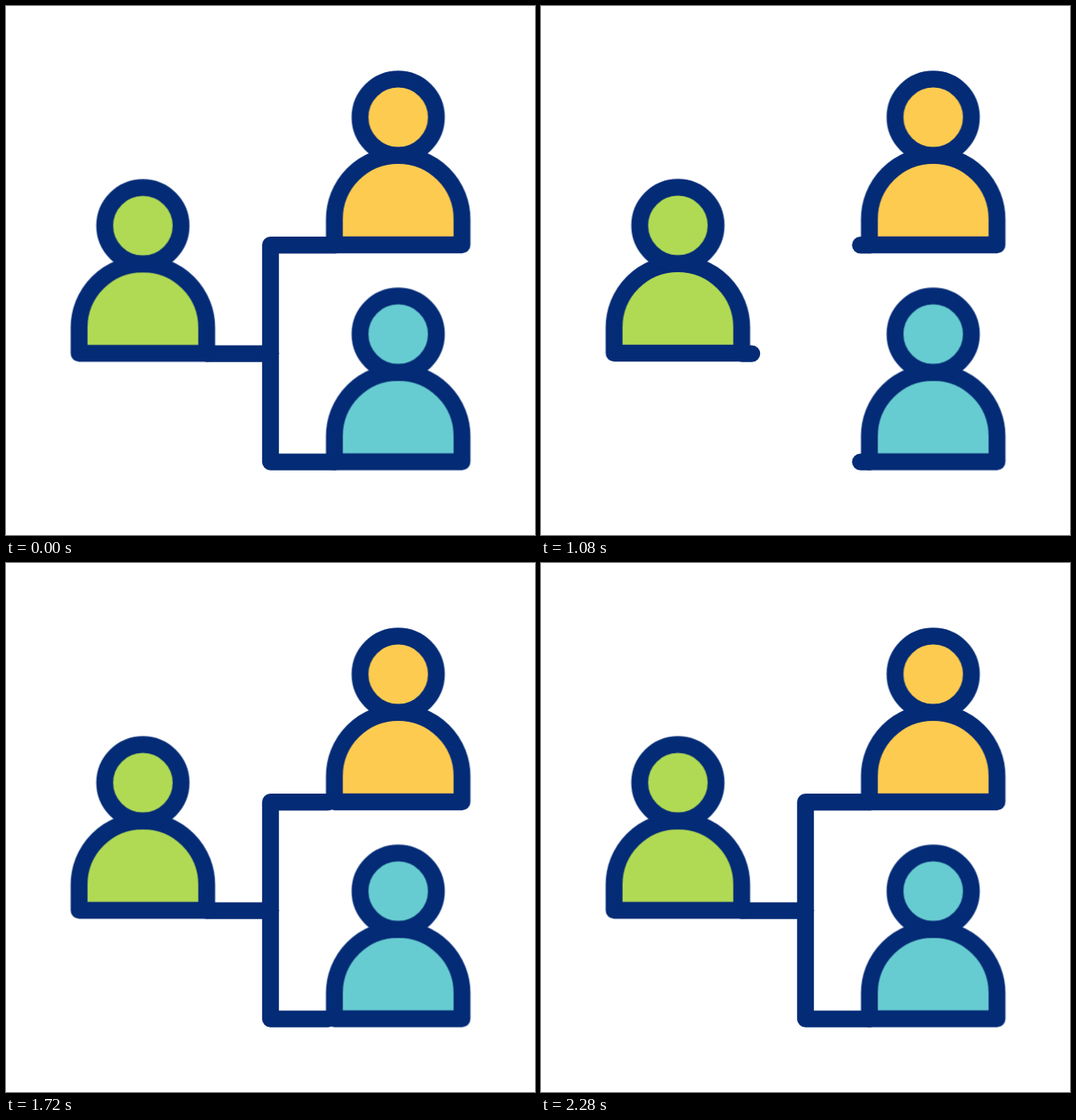
Recreate the animation shown at these times as an HTML page without scripts. Size 640 by 640 pixels, loop 2520 ms.

```html
<!DOCTYPE html>
<html lang="en">
<head>
<meta charset="utf-8">
<title>Team links</title>
<style>
  html, body { margin: 0; width: 100%; height: 100%; overflow: hidden; background: #fff; }
  svg { display: block; width: 100%; height: 100%; }

  .ink { stroke: #042b76; stroke-width: 20.4; stroke-linecap: round; stroke-linejoin: round; }
  .link { fill: none; stroke-dasharray: 1 2; }
  .stem { animation: stem 2.52s linear infinite; }
  .arm { animation: arm 2.52s linear infinite; }

  .body { animation: body 2.52s linear infinite; }
  .head { animation: head 2.52s linear infinite; }
  .late .body, .late .head { animation-delay: .7s; }

  /* A negative offset erases from the start, a positive one draws from it */
  @keyframes stem {
    0% { stroke-dashoffset: 0; }
    12.7% { stroke-dashoffset: 0; animation-timing-function: cubic-bezier(.33, 0, .67, 1); }
    28.57% { stroke-dashoffset: -1.01; animation-timing-function: step-end; }
    38.89% { stroke-dashoffset: 1.01; animation-timing-function: cubic-bezier(.33, 0, .67, 1); }
    54.76%, 100% { stroke-dashoffset: 0; }
  }
  @keyframes arm {
    0% { stroke-dashoffset: 0; }
    19.05% { stroke-dashoffset: 0; animation-timing-function: cubic-bezier(.42, 0, .75, .8); }
    34.92% { stroke-dashoffset: -.64; animation-timing-function: cubic-bezier(.39, .575, .565, 1); }
    48.41% { stroke-dashoffset: -1.01; animation-timing-function: step-end; }
    54.76% { stroke-dashoffset: 1.01; animation-timing-function: cubic-bezier(.33, 0, .67, 1); }
    70.08%, 100% { stroke-dashoffset: 0; }
  }

  /* The head flies a little higher than the body */
  @keyframes body {
    0%, 42.86% { transform: translateY(0); }
    45.24% { transform: translateY(-15.7px); animation-timing-function: ease-out; }
    47.22% { transform: translateY(-23px); animation-timing-function: ease-in; }
    51.59% { transform: translateY(-6.8px); animation-timing-function: ease-out; }
    60.32% { transform: translateY(-2.6px); }
    62.5%, 100% { transform: translateY(0); }
  }
  @keyframes head {
    0%, 42.86% { transform: translateY(0); }
    45.24% { transform: translateY(-22.8px); animation-timing-function: ease-out; }
    47.22% { transform: translateY(-30px); animation-timing-function: ease-in; }
    51.59% { transform: translateY(-13.7px); animation-timing-function: ease-out; }
    60.32% { transform: translateY(-2.6px); }
    62.5%, 100% { transform: translateY(0); }
  }
</style>
</head>
<body>
<svg viewBox="0 0 640 640">
  <g class="ink">
    <path class="link stem" pathLength="1" d="M243.4 420.6H320"/>
    <path class="link arm" pathLength="1" d="M320 420.4V289.2H397.4"/>
    <path class="link arm" pathLength="1" d="M320 420.4V551.6H397.4"/>

    <g transform="translate(165.6 420.2)" fill="#b1da54">
      <path class="body" d="M-77.2 0V-31a77.2 77.2 0 0 1 154.4 0V0Z"/>
      <circle class="head" cy="-154.4" r="46.2"/>
    </g>
    <g class="late" transform="translate(474.5 289)" fill="#fdcb50">
      <path class="body" d="M-77.2 0V-31a77.2 77.2 0 0 1 154.4 0V0Z"/>
      <circle class="head" cy="-154.4" r="46.2"/>
    </g>
    <g class="late" transform="translate(474.5 551.4)" fill="#67ccd1">
      <path class="body" d="M-77.2 0V-31a77.2 77.2 0 0 1 154.4 0V0Z"/>
      <circle class="head" cy="-154.4" r="46.2"/>
    </g>
  </g>
</svg>
</body>
</html>
```
